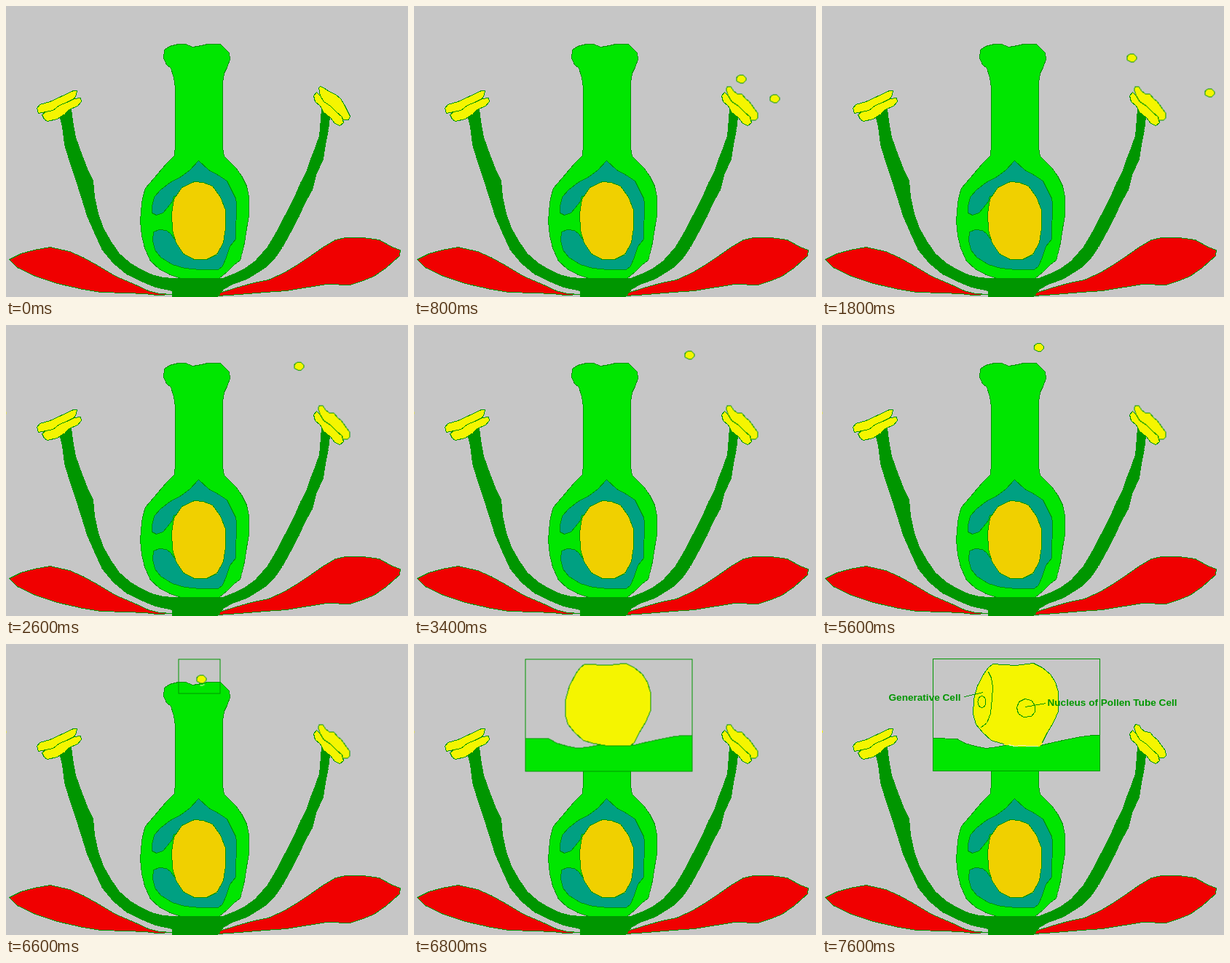
Recreate the animation shown at these times as an HTML page. Size 552 by 400 pixels, loop 8000 ms.

```html
<!DOCTYPE html>
<html lang="en">
<head>
<meta charset="utf-8">
<title>Pollination</title>
<style>
  :root { --line: #009600; --pollen: #f5f500; --leaf: #00e600; --sky: #c6c6c6; }
  html, body { margin: 0; width: 100%; height: 100%; overflow: hidden; background: var(--sky); }
  svg { display: block; width: 552px; height: 400px; shape-rendering: crispEdges; }
  polygon, polyline, ellipse, rect { stroke: var(--line); stroke-width: 1; }
  polyline { fill: none; }
  .leaf { fill: var(--leaf); }
  .stem { fill: var(--line); }
  .sepal { fill: #f00000; }
  .sac { fill: #00a082; }
  .egg { fill: #f0d000; }
  .pollen { fill: var(--pollen); }
  .sky { fill: var(--sky); }
  .bare { stroke: none; }
  .pale { stroke: #f2eec0; }
  text { font: bold 13.6px "Liberation Sans", Arial, sans-serif; fill: var(--line); }

  .timed { animation: 8s step-end infinite; visibility: hidden; }
  .closed { animation-name: closed; }
  .opened { animation-name: opened; }
  .speck { animation-name: speck; }
  .frame { animation-name: frame; }
  .zoom { animation-name: zoom; }
  .labels { animation-name: labels; }
  .contact { animation-name: contact; }
  @keyframes closed { 0% { visibility: visible } 2.5%, 100% { visibility: hidden } }
  @keyframes opened { 0% { visibility: hidden } 2.5%, 100% { visibility: visible } }
  @keyframes speck { 0% { visibility: hidden } 30%, 100% { visibility: visible } }
  @keyframes frame { 0% { visibility: hidden } 82.5% { visibility: visible } 85%, 100% { visibility: hidden } }
  @keyframes zoom { 0% { visibility: hidden } 85%, 100% { visibility: visible } }
  @keyframes labels { 0% { visibility: hidden } 90%, 100% { visibility: visible } }
  @keyframes contact { 0% { visibility: hidden } 95%, 100% { visibility: visible } }

  /* Grains advance in 200 ms hops: each step count is segment length / 200 ms. */
  .drift { animation: drift 8s infinite; }
  .escape { animation: escape 8s infinite; }
  @keyframes drift {
    0%    { transform: translate(-50px, -50px); animation-timing-function: step-end }
    2.5%  { transform: translate(460px, 119px); animation-timing-function: steps(3) }
    10%   { transform: translate(449px, 100px); animation-timing-function: steps(2) }
    15%   { transform: translate(440px, 83px); animation-timing-function: steps(3) }
    22.5% { transform: translate(425px, 71px); animation-timing-function: steps(3) }
    30%   { transform: translate(408px, 60px); animation-timing-function: steps(5) }
    42.5% { transform: translate(378px, 41px); animation-timing-function: steps(7) }
    60%   { transform: translate(332px, 25px); animation-timing-function: step-end }
    62.5% { transform: translate(323px, 24px); animation-timing-function: steps(2) }
    67.5% { transform: translate(306px, 27px); animation-timing-function: steps(3) }
    75%   { transform: translate(280px, 37px); animation-timing-function: steps(2) }
    80%, 100% { transform: translate(268px, 48px) }
  }
  @keyframes escape {
    0%    { transform: translate(-50px, -50px); animation-timing-function: step-end }
    2.5%  { transform: translate(469px, 139px); animation-timing-function: steps(3) }
    10%   { transform: translate(495px, 127px); animation-timing-function: steps(2) }
    15%   { transform: translate(512px, 122px); animation-timing-function: steps(3) }
    22.5% { transform: translate(532px, 119px); animation-timing-function: steps(4) }
    32.5%, 100% { transform: translate(562px, 119px) }
  }
</style>
</head>
<body>
<svg viewBox="0 0 552 400">
  <defs>
    <polygon id="grain" points="-7,-1 -5,-4 -1,-6 3,-5 6,-2 6,2 3,5 -2,5 -6,3"/>
  </defs>
  <rect class="sky bare" width="552" height="400"/>
  <g transform="translate(.5 .5)">
    <polygon class="sepal" points="4,348 20,340 38,335 60,331 87,337 105,345 125,356 150,371 178,383 195,391 210,395 228,396 207,397 190,395 165,394 130,393 105,389 70,381 40,371 15,359"/>
    <polygon class="sepal" points="290,395 315,387 340,380 360,376 382,366 400,355 418,343 435,331 452,321 466,318 490,318 512,321 530,331 541,335 540,343 522,359 505,371 490,377 472,383 440,382 415,386 385,391 355,393 320,396 290,398"/>
    <polygon class="leaf" points="217,60 224,55 236,52 246,52 256,56 268,54 276,52 294,52 300,58 306,64 307,73 303,84 299,92 297,105 297,195 299,206 306,213 315,222 323,233 330,247 333,262 333,288 330,305 327,325 323,342 321,349 313,355 303,365 292,374 262,376 240,374 225,369 210,361 198,350 190,332 186,315 184,295 186,270 188,260 191,250 203,236 220,216 231,205 232,190 232,112 230,98 226,85 220,80 216,71"/>
    <polygon class="sac" points="264,212 278,225 291,232 303,240 309,252 315,264 316,270 315,320 307,330 302,345 297,357 291,362 266,362 245,360 228,355 212,345 204,335 201,322 202,310 210,307 220,308 226,313 231,320 250,320 250,260 230,261 228,268 221,277 215,284 206,287 200,284 200,275 203,262 212,252 225,242 240,234 252,225"/>
    <polygon class="egg" points="258,241 270,242 283,247 294,262 301,280 301,305 298,325 289,341 275,348 258,348 243,340 233,325 228,308 227,285 230,265 241,249"/>
    <polygon class="stem" points="73,150 89,141 91,158 95,180 104,205 113,228 119,240 121,262 126,285 133,305 144,324 155,340 170,353 185,362 200,369 215,373 230,374 297,374 310,369 327,361 342,350 358,332 369,314 381,291 392,270 399,255 404,243 412,228 418,210 424,195 430,178 432,155 433,141 444,152 442,170 438,190 435,210 425,232 420,252 410,270 402,288 391,309 379,331 368,347 357,358 343,367 330,375 310,382 298,389 290,399 228,399 228,391 205,386 188,379 165,368 147,353 132,335 122,313 111,288 104,265 96,240 87,213 80,190 77,165"/>

    <g class="pollen">
      <polygon points="42,140 46,135 60,131 75,124 92,116 97,116 96,122 93,127 83,132 73,136 64,143 54,145 44,147"/>
      <polygon points="49,149 54,145 64,143 73,136 83,132 93,127 102,126 103,131 98,137 86,142 80,148 70,155 56,158 52,155"/>
      <polygon points="422,123 426,118 431,123 436,131 445,137 453,145 461,152 463,160 458,164 451,161 445,153 436,146 431,137 424,131"/>
      <polygon class="timed closed" points="429,112 431,110 436,112 443,117 452,121 459,127 464,135 472,151 470,156 462,156 461,152 453,145 445,137 436,131 431,123"/>
      <use href="#grain" class="drift"/>
      <use href="#grain" class="escape"/>
      <polygon class="timed opened" points="428,114 430,110 435,111 438,116 443,120 450,121 455,127 460,131 465,138 471,146 472,153 469,156 462,156 461,152 453,145 445,137 436,131 431,123"/>
      <rect class="timed speck bare" x="-1" y="118.5" width="1.4" height="3"/>
    </g>

    <g class="timed frame">
      <rect x="236" y="20" width="57" height="47" fill="none"/>
      <polyline class="pale" points="266,56 270,56 272,55"/>
    </g>

    <g class="timed zoom">
      <rect class="sky" x="152" y="20" width="229" height="154"/>
      <polygon class="leaf" points="152,129 185,130 196,136 210,140 225,143 240,141 255,138 300,139 312,136 335,131 355,127 372,125 381,125 381,174 152,174"/>
      <polygon class="pollen" points="234,27 265,29 290,26 302,32 313,41 320,52 324,65 324,92 318,106 308,123 302,135 296,140 262,139 245,136 232,132 220,121 211,110 207,96 208,75 213,57 222,40 228,32"/>
    </g>
    <g class="timed labels">
      <polyline points="228,38 232,46 234,58 233,75 231,95 226,108 218,114"/>
      <ellipse class="pollen" cx="219" cy="79" rx="5.5" ry="8"/>
      <polygon class="pollen" points="267,87 270,79 278,75 287,77 292,84 292,93 287,99 276,100 269,95"/>
      <polyline points="195,72 221,66"/>
      <polyline points="307,81 279,86"/>
      <text x="91" y="77.5">Generative Cell</text>
      <text x="309" y="84.5">Nucleus of Pollen Tube Cell</text>
    </g>
    <g class="timed contact">
      <polygon class="pollen bare" points="249,134 300,134 302,136 297,141 262,140 250,138"/>
      <polyline class="pale" points="256,138 264,140 274,139 284,140 296,140"/>
    </g>
  </g>
</svg>
</body>
</html>
```
